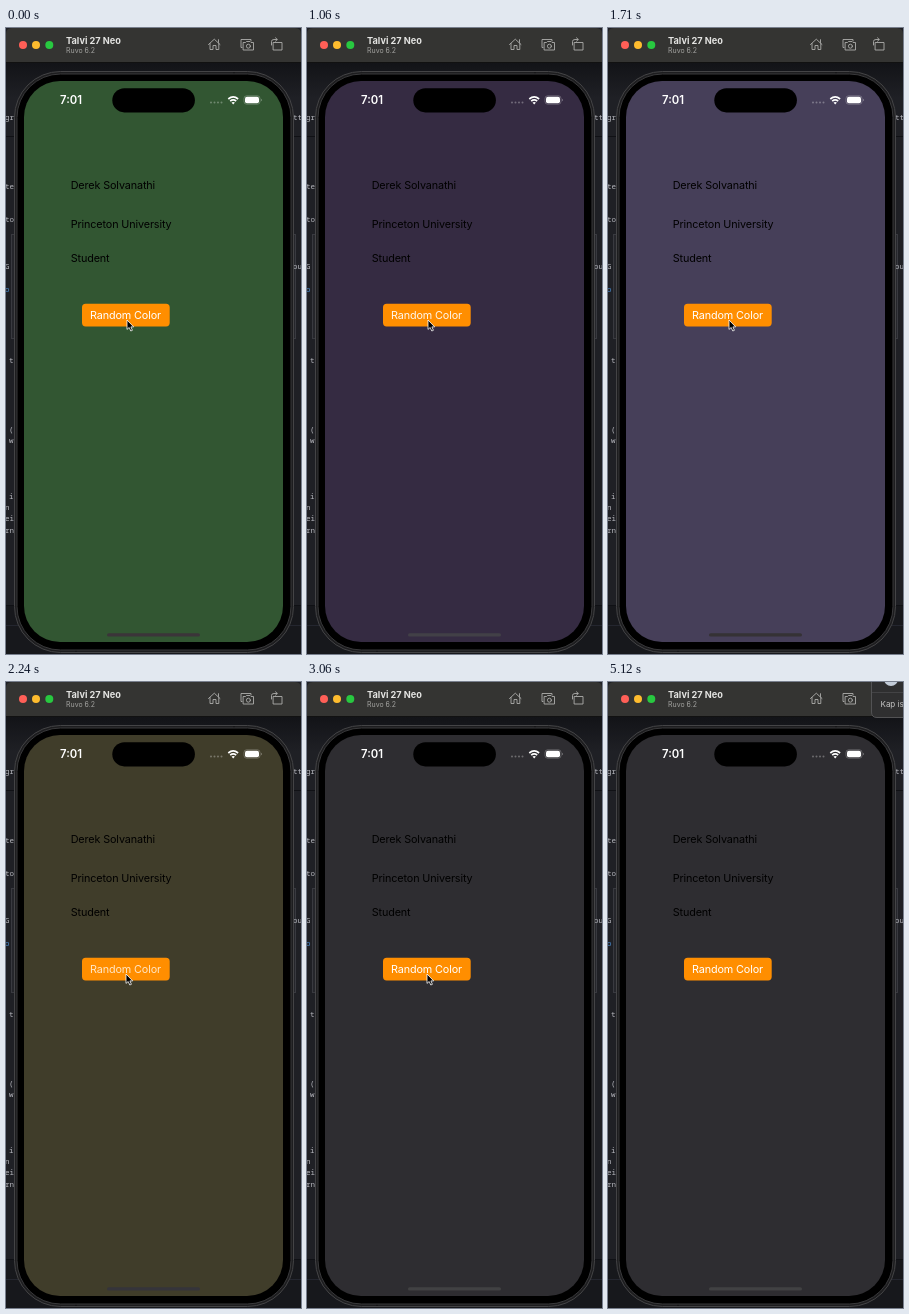
Write an HTML page that moves like this. It is 295 by 626 pixels and loops after 5240 ms.

```html
<!DOCTYPE html>
<html lang="en">
<head>
<meta charset="utf-8">
<title>Random Color</title>
<style>
html, body { margin: 0; width: 100%; height: 100%; overflow: hidden; background: #1f2025; }
svg { display: block; width: 295px; height: 626px; font-family: Inter, "Open Sans", sans-serif; }
.label { font-size: 10.8px; letter-spacing: -.12px; }
.code { font: 7.5px "Noto Sans Mono", "DejaVu Sans Mono", monospace; fill: #b9bac0; }
.icon { fill: none; stroke: #adadab; stroke-width: .9; stroke-linejoin: round; stroke-linecap: round; }
</style>
</head>
<body>
<svg viewBox="0 0 295 626">
  <defs>
    <linearGradient id="shade" x2="0" y2="1">
      <stop stop-color="#121317"/><stop offset="1" stop-color="#1f2025"/>
    </linearGradient>
  </defs>

  <!-- editor behind the window -->
  <rect width="295" height="626" fill="#1f2025"/>
  <rect y="34" width="295" height="36" fill="url(#shade)"/>
  <rect x="5.5" y="206.5" width="284" height="104" fill="#25262b" stroke="#393a40"/>
  <rect y="577" width="295" height="49" fill="#17181c"/>
  <path d="M0 108.5H295M0 577.5H295" stroke="#101115"/>
  <path d="M0 597.5H295" stroke="#24262f"/>
  <g class="code" id="code"></g>

  <!-- title bar -->
  <path d="M0 34V6Q0 0 6 0H289Q295 0 295 6V34Z" fill="#343432"/>
  <path d="M0 34.5H295" stroke="#111"/>
  <circle cx="17" cy="17" r="4" fill="#ff5f57"/>
  <circle cx="30" cy="17" r="4" fill="#febc2e"/>
  <circle cx="43.3" cy="17" r="4" fill="#28c840"/>
  <text x="60" y="16" font-size="9.2" font-weight="700" fill="#e4e4e2">Talvi 27 Neo</text>
  <text x="60" y="25.3" font-size="7" fill="#a3a3a0">Ruvo 6.2</text>
  <g class="icon">
    <path d="M202.5 16.5L208.3 11.2L214 16.5M204 15.500V21.500H207V17.500H210V21.500H212.800V15.500M212.500 11.700V14.500"/>
    <path d="M236 19.5H235V11.5H245V13"/>
    <path d="M237.500 14.500H239.500L240.500 13.500H244L245 14.500H247.500V22H237.500Z"/>
    <circle cx="242.400" cy="18.200" r="2"/>
    <path d="M267.500 14.500H276V22H267.500ZM265.500 17V13.500Q265.500 11.500 268 11.500H271M269.500 9.800L271.300 11.500L269.500 13.200"/>
  </g>

  <!-- device -->
  <rect x="8.500" y="43.500" width="279" height="581" rx="46" fill="#1d1d1f" stroke="#444446"/>
  <path d="M228 44V46M70 622V624" stroke="#161618" stroke-width="2"/>
  <rect x="11" y="46" width="274" height="576" rx="43.500" fill="#000" stroke="#39393b"/>
  <rect id="screen" x="18" y="53" width="259" height="561" rx="36"/>
  <rect x="106.300" y="60.200" width="82.600" height="24.200" rx="12.100"/>
  <rect id="bar" x="101" y="605.200" width="93" height="3.400" rx="1.700"/>

  <g fill="#fff">
    <text x="54" y="76" font-size="11.3" font-weight="600">7:01</text>
    <path d="M205 74.500H217" stroke="#fff" stroke-opacity=".3" stroke-width="2" stroke-linecap="round" stroke-dasharray="0 3.500"/>
    <path d="M222.300 71Q227.200 66.800 232.100 71M224.200 73.200Q227.200 70.700 230.200 73.200" fill="none" stroke="#fff" stroke-width="1.700"/>
    <path d="M225.500 74.600Q227.200 73.400 228.900 74.600L227.200 76.400Z"/>
    <rect x="239" y="68.800" width="14" height="6.400" rx="1.900"/>
    <rect x="238" y="67.800" width="16" height="8.400" rx="2.700" fill="none" stroke="#fff" stroke-opacity=".35" stroke-width=".7"/>
    <path d="M255 70.700Q256.700 72 255 73.300Z" opacity=".5"/>
  </g>

  <g class="label">
    <text x="64.700" y="161">Derek Solvanathi</text>
    <text x="64.700" y="200">Princeton University</text>
    <text x="64.700" y="234.300">Student</text>
    <rect x="76" y="275.700" width="87.700" height="22.700" rx="3.700" fill="#ff8e00"/>
    <text id="title" x="84" y="291" fill="#fff">Random Color</text>
  </g>

  <!-- notification -->
  <g id="note">
    <path d="M263.500 -2V30Q263.500 35.500 269 35.500H300V-2Z" fill="#2f2f30" stroke="#525254"/>
    <path d="M264 10.500H300" stroke="#434345"/>
    <circle cx="283" cy="-3" r="7" fill="#c3ccd8"/>
    <text x="272.500" y="25" font-size="8" fill="#c4c4c4">Kap is</text>
  </g>

  <!-- pointers, each drawn from its own hot spot -->
  <path id="arrow" d="M0 0V9.400L2.200 7.500L3.800 11L5.400 10.300L3.900 6.900H6.700Z" fill="#000" stroke="#fff" stroke-width=".8"/>
  <g id="resize" fill="none" stroke-linejoin="round">
    <path d="M-3 3L3 -3M0 -4H4V0M0 4H-4V0" stroke="#fff" stroke-width="3"/>
    <path d="M-3 3L3 -3M0 -4H4V0M0 4H-4V0" stroke="#000" stroke-width="1.200"/>
  </g>
</svg>
<script>
const LOOP = 5240;
const BEAT = 385, FIRST = 365, LAST = 2675;   // steady clicking on the button
const $ = id => document.getElementById(id);
const clamp = x => Math.min(1, Math.max(0, x));
const smooth = x => (x = clamp(x)) * x * (3 - 2 * x);

// start time, screen colour, home bar colour
const scenes = [
  [0, '#325632', '#3b3439'],
  [FIRST, '#352b42', '#424047'],
  [FIRST + 2 * BEAT, '#463f59', '#353235'],
  [FIRST + 4 * BEAT, '#403d2a', '#35343a'],
  [FIRST + 5 * BEAT, '#16535f', '#3b3439'],
  [LAST, '#2e2d31', '#414143']
];

const pointerPath = [
  [0, 121, 292], [2000, 121, 292], [2200, 120, 292], [3200, 120, 292],
  [3760, 275, 48], [3880, 289, 37], [4060, 304, -8]
];

const fragments = [
  [-1, 92, 'gr'], [-1, 161, 'te'], [-1, 194, 'to'], [-1, 241, 'G'], [-1, 264, 'o', '#4b8fd6'],
  [3, 335, 't'], [3, 404, '('], [3, 415, 'w'], [3, 471, 'i'], [-1, 482, 'n'],
  [-1, 493, 'ei'], [-1, 505, 'rn'], [287, 92, 'tt'], [287, 241, 'ou']
];
$('code').innerHTML = fragments.map(([x, y, s, c]) =>
  `<text x="${x}" y="${y}"${c ? ` style="fill:${c}"` : ''}>${s}</text>`).join('');

// the title dims while pressed and fades back after release
function titleOpacity(t) {
  const click = FIRST + BEAT * Math.round((t - FIRST) / BEAT);
  if (click < FIRST || click > LAST) return 1;
  const d = t - click;
  return 1 - .25 * (d < 0 ? clamp((d + 85) / 40) : clamp(1 - d / 180));
}

function pointerAt(t) {
  const i = pointerPath.findIndex(p => p[0] > t);
  if (i < 0) return pointerPath.at(-1).slice(1);
  const [t0, x0, y0] = pointerPath[i - 1], [t1, x1, y1] = pointerPath[i];
  const k = smooth((t - t0) / (t1 - t0));
  return [x0 + (x1 - x0) * k, y0 + (y1 - y0) * k];
}

function draw(t) {
  const [, screen, bar] = scenes.findLast(s => s[0] <= t);
  $('screen').setAttribute('fill', screen);
  $('bar').setAttribute('fill', bar);
  $('title').setAttribute('opacity', titleOpacity(t));

  const place = `translate(${pointerAt(t)})`;
  const resizing = t >= 3800;
  $('arrow').setAttribute('transform', place);
  $('resize').setAttribute('transform', place);
  $('arrow').style.display = resizing ? 'none' : '';
  $('resize').style.display = resizing && t < 4060 ? '' : 'none';

  const slide = 1 - (1 - clamp((t - 4240) / 520)) ** 3;
  $('note').setAttribute('transform', `translate(${34 * (1 - slide)})`);
}

const start = performance.now();
(function tick() {
  draw((performance.now() - start) % LOOP);
  requestAnimationFrame(tick);
})();
</script>
</body>
</html>
```
